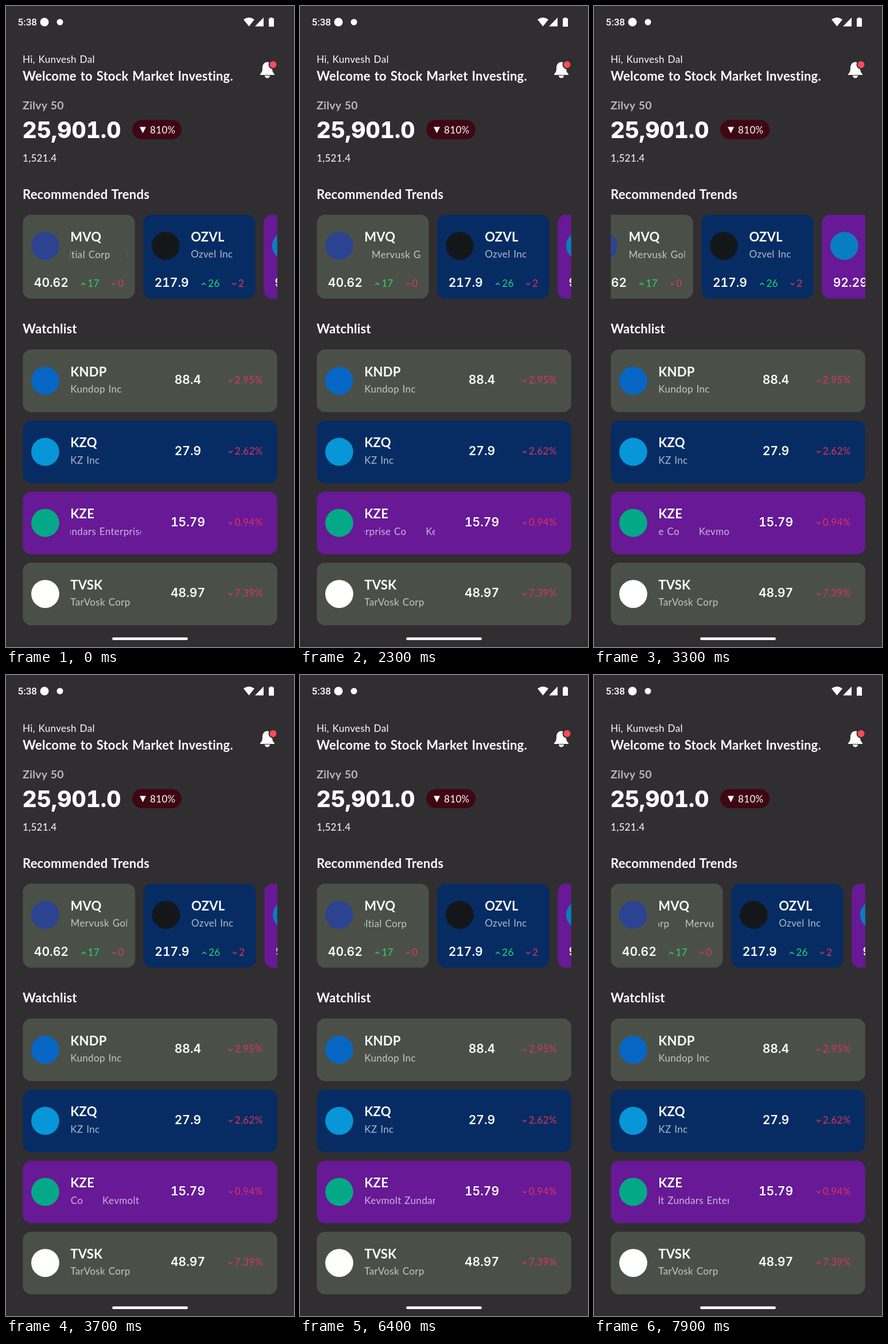
An HTML page for the animation above (8000 ms loop, 502x1116 px).

```html
<!DOCTYPE html>
<html lang="en">
<head>
<meta charset="utf-8">
<title>Stock overview</title>
<style>
  html, body { margin: 0; width: 100%; height: 100%; overflow: hidden; background: #302e30; }
  #stage { display: block; width: 100vw; height: 100vh; }
  text { font: 400 17px Lato, "Open Sans", sans-serif; letter-spacing: .02em; word-spacing: .06em; fill: #fff; white-space: pre; }
  .head { font-size: 22px; font-weight: 700; letter-spacing: .01em; }
  .index { font-size: 19.5px; font-weight: 700; letter-spacing: .01em; fill: #b9b8b9; }
  .total, .price { font-family: Inter, sans-serif; font-variant-numeric: tabular-nums; letter-spacing: 0; }
  .total { font-size: 39px; font-weight: 800; }
  .price { font-size: 21px; font-weight: 600; }
  .sub { fill: rgba(255, 255, 255, .68); }
  .clock { font: 500 17px Roboto, sans-serif; letter-spacing: 0; }
  .up { fill: #2bd672; }
  .down { fill: #dc355f; }
  .caret { fill: none; stroke-width: 1.5; }
  .caret.up { stroke: #2bd672; }
  .caret.down { stroke: #dc355f; }
</style>
</head>
<body>
<svg id="stage" viewBox="0 0 502 1116">
  <g fill="#fff">
    <text class="clock" x="20.5" y="34">5:38</text>
    <circle cx="67" cy="28" r="7.5"/>
    <circle cx="94" cy="28" r="5.5"/>
    <path d="M414 23.500Q423.500 16.500 433 23.500L423.500 35.500Z"/>
    <path d="M449 20V35.500H434Z"/>
    <path d="M460.500 20h4v1.500h2.500v14.500h-9v-14.500h2.500z"/>
  </g>

  <text x="29" y="99">Hi, Kunvesh Dal</text>
  <text class="head" x="29" y="129.500">Welcome to Stock Market Investing.</text>
  <path fill="#fff" d="M443 118.500c3-3 4-5 4-11c0-6 4-10 8.500-10s8.500 4 8.500 10c0 6 1 8 4 11v1.500h-25zM451 121h9a4.500 4.500 0 0 1-9 0z"/>
  <circle cx="465.500" cy="102" r="8" fill="#302e30"/>
  <circle cx="465.500" cy="102" r="6" fill="#fb4b59"/>

  <text class="index" x="29" y="179.500">Zilvy 50</text>
  <text class="total" x="28.500" y="229.500">25,901.0</text>
  <rect x="220" y="198.500" width="86" height="33.500" rx="16.750" fill="#3f0613"/>
  <path d="M233 210.500h11l-5.500 11z" fill="#fff"/>
  <text x="251" y="221.500">810%</text>
  <text x="29" y="271">1,521.4</text>

  <text class="head" x="29" y="335.500">Recommended Trends</text>
  <svg x="29.300" y="363.200" width="443.500" height="147"><g id="trends"></g></svg>
  <text class="head" x="29" y="570">Watchlist</text>
  <g id="watchlist"></g>
  <rect x="185" y="1099.200" width="132" height="4.900" rx="2.450" fill="#f7f5f7"/>
</svg>
<script>
const LOOP = 8000, STEP = 100;
const SPEED = 0.0366;   // marquee, px per ms
const PAUSE = 1200;     // rest between marquee runs, ms
const COLORS = ['#4a5047', '#062c63', '#671996'];

// A marquee is described by its cycle length and the time it comes to rest.
const trends = [
  { code: 'MVQ', name: 'Mervusk Goltial Corp', price: '40.62', up: 17, down: 0, logo: '#2c4391', cycle: 195, rest: 2642 },
  { code: 'OZVL', name: 'Ozvel Inc', price: '217.9', up: 26, down: 2, logo: '#14171a' },
  { code: 'FYOL', name: 'Fyol Technics Inc', price: '92.29', up: 21, down: 3, logo: '#097dc1', cycle: 180, rest: 3155 }
];
const watchlist = [
  { code: 'KNDP', name: 'Kundop Inc', price: '88.4', change: '2.95%', logo: '#0766c4' },
  { code: 'KZQ', name: 'KZ Inc', price: '27.9', change: '2.62%', logo: '#0796d7' },
  { code: 'KZE', name: 'Kevmolt Zundars Enterprise Co', price: '15.79', change: '0.94%', logo: '#03a987', cycle: 279, rest: 5223 },
  { code: 'TVSK', name: 'TarVosk Corp', price: '48.97', change: '7.39%', logo: '#fff' }
];

const text = (x, y, content, cls, anchor = 'start') =>
  `<text x="${x}" y="${y}" class="${cls}" text-anchor="${anchor}">${content}</text>`;

const caret = (x, y, dir) =>
  `<path class="caret ${dir}" d="M${x} ${y}l3.500 ${dir === 'up' ? -3.5 : 3.5}l3.500 ${dir === 'up' ? 3.5 : -3.5}"/>`;

function subtitle(stock, y, width) {
  if (!stock.cycle) return text(83, y, stock.name, 'sub');
  return `<svg x="83" y="${y - 18}" width="${width}" height="26"><g id="${stock.code}">
    ${text(0, 18, stock.name, 'sub')}${text(stock.cycle, 18, stock.name, 'sub')}</g></svg>`;
}

const card = (stock, i, x, y, width, height, details) =>
  `<g transform="translate(${x} ${y})">
    <rect width="${width}" height="${height}" rx="14.600" fill="${COLORS[i % 3]}"/>
    <circle cx="39.100" cy="54.400" r="24.400" fill="${stock.logo}"/>
    ${text(83, 46.5, stock.code, 'head')}${details}</g>`;

const byId = id => document.getElementById(id);

byId('trends').innerHTML = trends.map((s, i) => card(s, i, i * 209.9, 0, 195.2, 146.4,
  subtitle(s, 75.3, 98) +
  text(19.5, 126, s.price, 'price') +
  caret(102, 122.5, 'up') + text(113, 125.5, s.up, 'up') +
  caret(155, 118.8, 'down') + text(165.8, 125.5, s.down, 'down'))).join('');

byId('watchlist').innerHTML = watchlist.map((s, i) => card(s, i, 29.3, 598.1 + i * 123.7, 443.5, 109,
  subtitle(s, 75, 123) +
  text(287.7, 60.2, s.price, 'price', 'middle') +
  caret(358.7, 52.7, 'down') + text(369.5, 59.2, s.change, 'down'))).join('');

const ease = p => (1 - Math.cos(Math.PI * Math.min(1, Math.max(0, p)))) / 2;

function marqueeX({ cycle, rest }, t) {
  if (t < rest) return SPEED * (rest - t) - cycle;
  return -SPEED * Math.max(0, t - rest - PAUSE);
}

function draw(now) {
  const t = Math.floor((now + 2) / STEP) * STEP % LOOP;
  for (const stock of [...trends, ...watchlist]) {
    if (stock.cycle) byId(stock.code).setAttribute('transform', `translate(${marqueeX(stock, t)} 0)`);
  }
  // Swipe left, swipe back, then a short overscroll stretch at the edge.
  const x = -150 * (ease((t - 2300) / 700) - ease((t - 3000) / 500));
  const stretch = t < 3500 ? 1 : 1 + 0.02 * Math.exp((3500 - t) / 105);
  byId('trends').setAttribute('transform', `translate(${x} 0) scale(${stretch} 1)`);
  requestAnimationFrame(() => draw(performance.now()));
}
draw(performance.now());
</script>
</body>
</html>
```
